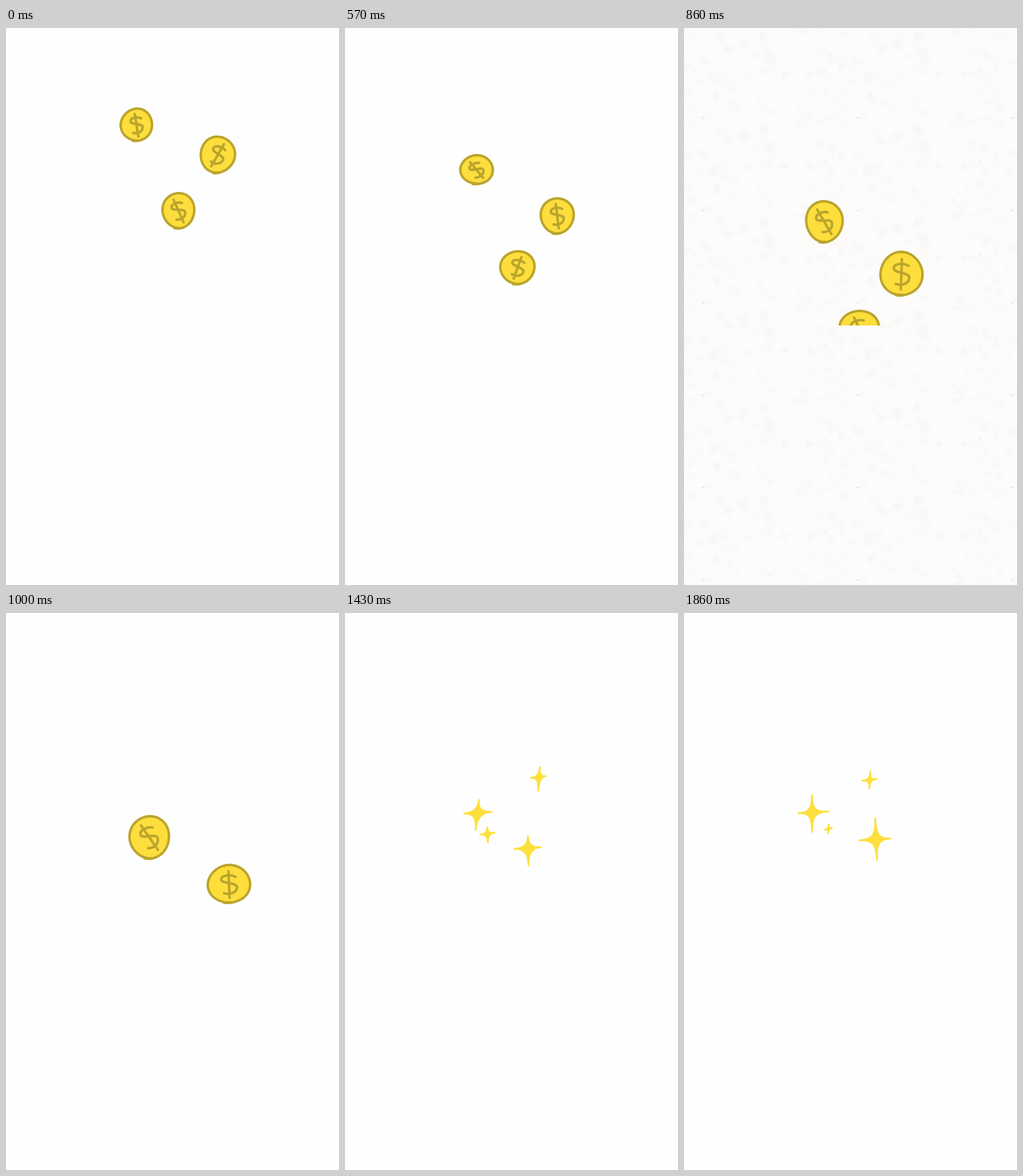
Animation of 579 by 968 pixels, one loop 2010 ms. Source, as an HTML page:

```html
<!DOCTYPE html>
<html lang="en">
<head>
<meta charset="utf-8">
<title>Falling coins</title>
<style>
  html, body { margin: 0; width: 100%; height: 100%; overflow: hidden; background: #fefefe; }
  svg { display: block; width: 579px; height: 968px; }
  .pose { visibility: hidden; animation: short 2010ms step-end infinite; }
  .pose.held { animation-name: long; }
  .coin { fill: #fdde3c; stroke: #baa52d; stroke-width: 4.3; stroke-linecap: round; stroke-linejoin: round; }
  .mark { fill: none; vector-effect: non-scaling-stroke; }
  .star { fill: #ffdf3d; stroke: #ffdf3d; stroke-width: 3; stroke-linejoin: round; }
  .fleck { fill: none; stroke: #c9c8c4; stroke-width: .8; }
  @keyframes short { 0% { visibility: visible } 6.9652%, 100% { visibility: hidden } }
  @keyframes long { 0% { visibility: visible } 7.4627%, 100% { visibility: hidden } }
</style>
</head>
<body>
<svg id="stage" viewBox="0 0 579 968">
  <defs id="defs">
    <radialGradient id="smudge">
      <stop offset="0" stop-color="#d8d6d0" stop-opacity=".09"/>
      <stop offset="1" stop-color="#d8d6d0" stop-opacity="0"/>
    </radialGradient>
    <pattern id="paper" width="268.5" height="160.6" patternUnits="userSpaceOnUse"></pattern>
  </defs>
</svg>
<script>
const LOOP = 2010, POSES = 14, FPS = 7;
const PAPER_POSE = 6, FIRST_STARS = 10;
const S_CURVE = 'M.75-.85C.1-1.1-1-.95-1-.5C-1 0 1-.3 1 .25C1 .8 .2 1.1-.55 .95';

// Each key, two poses apart: x, y, half width, half height, lean of the bar
const coins = [
  { rim: 534, keys: [[227, 168, 27, 28, -9], [227, 198, 26, 26, -22], [229, 246, 28, 25, -40],
    [244, 336, 32, 35, -30], [254, 448, 37, 36, -41], [262, 580, 37, 36, -40]] },
  { rim: 511, keys: [[368, 220, 30, 31, 30], [372, 240, 27, 29, 28], [369, 326, 29, 30, -7],
    [378, 427, 37, 37, 2], [398, 513, 35, 28, -8], [410, 600, 35, 30, -8]] },
  { rim: 517, keys: [[300, 317, 28, 30, -24], [302, 364, 27, 27, 28], [300, 416, 30, 28, 20],
    [305, 522, 34, 31, -25], [308, 620, 34, 31, -25]] }
];

// First and last shape: x, y, arms up, right, down, left, lean
const stars = [
  [[230, 347, 22, 25, 30, 23, 3], [222.5, 346.5, 30, 28, 34, 24, 0]],
  [[337.5, 285, 17, 11, 24, 14, 1.5], [323, 290, 14, 12, 15, 13, 1]],
  [[248, 383.5, 11, 12, 15, 13, -.5], [251, 375, 7, 6, 8, 6, .5]],
  [[318.5, 408.5, 21, 22, 30, 24, -.5], [334, 393.5, 37, 25, 36, 29, -1.5]]
];

let seed = 11;
function rnd(a, b) {
  seed = seed * 16807 % 2147483647;
  return a + (b - a) * seed / 2147483647;
}

const path = (d, cls, extra = '') => `<path class="${cls}" d="${d}" ${extra}/>`;
const mix = (a, b, t) => a + (b - a) * t;

// Smooth curve through the keys, held at both ends
function sample(keys, t) {
  const key = i => keys[Math.max(0, Math.min(keys.length - 1, i))];
  const i = Math.floor(t), u = t - i;
  const [p, q, r, s] = [key(i - 1), key(i), key(i + 1), key(i + 2)];
  return q.map((v, k) => v + u / 2 * (r[k] - p[k] +
    u * (2 * p[k] - 5 * v + 4 * r[k] - s[k] + u * (3 * (v - r[k]) + s[k] - p[k]))));
}

// Hand-drawn ring: starts at the bottom and overshoots outwards a little
function ring(x, y, rx, ry) {
  const p = rnd(0, 6.3), q = rnd(0, 6.3), pts = [];
  for (let a = 1.5; a < 8.1; a += .1) {
    const k = .012 * Math.sin(2 * a + p) + .015 * Math.sin(3 * a + q);
    const out = Math.max(0, a - 7.5) * 2.5;
    pts.push([x + (rx * (1 + k) + out) * Math.cos(a), y + (ry * (1 + k) + out) * Math.sin(a)]);
  }
  return 'M' + pts.join('L');
}

function coin({ keys }, i, pose) {
  const [x, y, rx, ry, lean] = sample(keys, pose / 2);
  const place = turn => `translate(${x} ${y + 1}) rotate(${turn})`;
  return `<g class="coin" clip-path="url(#rim${i})">` + path(ring(x, y, rx, ry), '') +
    path(S_CURVE, 'mark', `transform="${place(.6 * lean + 5)} scale(${.39 * rx} ${.5 * ry})"`) +
    path(`M0 ${-.71 * ry}V${.71 * ry}`, 'mark', `transform="${place(lean)}"`) + '</g>';
}

function star([from, to], t) {
  const [x, y, up, right, down, left, lean] = from.map((v, k) => mix(v, to[k], t));
  const waist = mix(.3, .2, t), tilt = 1.5;
  const tips = [[lean, -up], [right, -tilt], [-lean, down], [-left, tilt]];
  const at = ([dx, dy], k) => [x + dx * k, y + dy * k];
  return path('M' + at(tips[0], 1) + tips.map((tip, i) => {
    const next = tips[(i + 1) % 4];
    return `C${at(tip, waist)} ${at(next, waist)} ${at(next, 1)}`;
  }).join('') + 'Z', 'star');
}

function makePaper() {
  let out = '<rect width="269" height="161" fill="#fdfcfb"/>';
  for (let i = 0; i < 60; i++)
    out += `<circle cx="${rnd(0, 268)}" cy="${rnd(0, 160)}" r="${rnd(6, 16)}" fill="url(#smudge)"/>`;
  for (let i = 0; i < 110; i++) {
    const len = rnd(1, 7), a = rnd(0, 6.3), b = a + rnd(-1, 1);
    out += path(`M${rnd(0, 268)} ${rnd(0, 160)}q${len * Math.cos(a)} ${len * Math.sin(a)} ` +
      `${len * Math.cos(b)} ${len * Math.sin(b)}`, 'fleck', `opacity="${rnd(.1, .4)}"`);
  }
  document.getElementById('paper').innerHTML = out + path('M31 156l5 1', 'fleck');
}

const startOf = i => i < POSES ? Math.round(i * 100 / FPS) * 10 : LOOP;

function addPose(i) {
  const paper = i === PAPER_POSE ? '<rect width="579" height="968" fill="url(#paper)"/>' : '';
  const body = i < FIRST_STARS
    ? coins.map((c, n) => coin(c, n, i)).join('')
    : stars.map(s => star(s, (i - FIRST_STARS) / (POSES - 1 - FIRST_STARS))).join('');
  const held = startOf(i + 1) - startOf(i) > 145 ? 'held' : '';
  document.getElementById('stage').insertAdjacentHTML('beforeend',
    `<g class="pose ${held}" style="animation-delay:${startOf(i) - LOOP}ms">${paper}${body}</g>`);
}

makePaper();
document.getElementById('defs').insertAdjacentHTML('beforeend', coins.map(({ rim }, i) =>
  `<clipPath id="rim${i}"><rect width="579" height="${rim}"/></clipPath>`).join(''));
for (let i = 0; i < POSES; i++) addPose(i);
</script>
</body>
</html>
```
